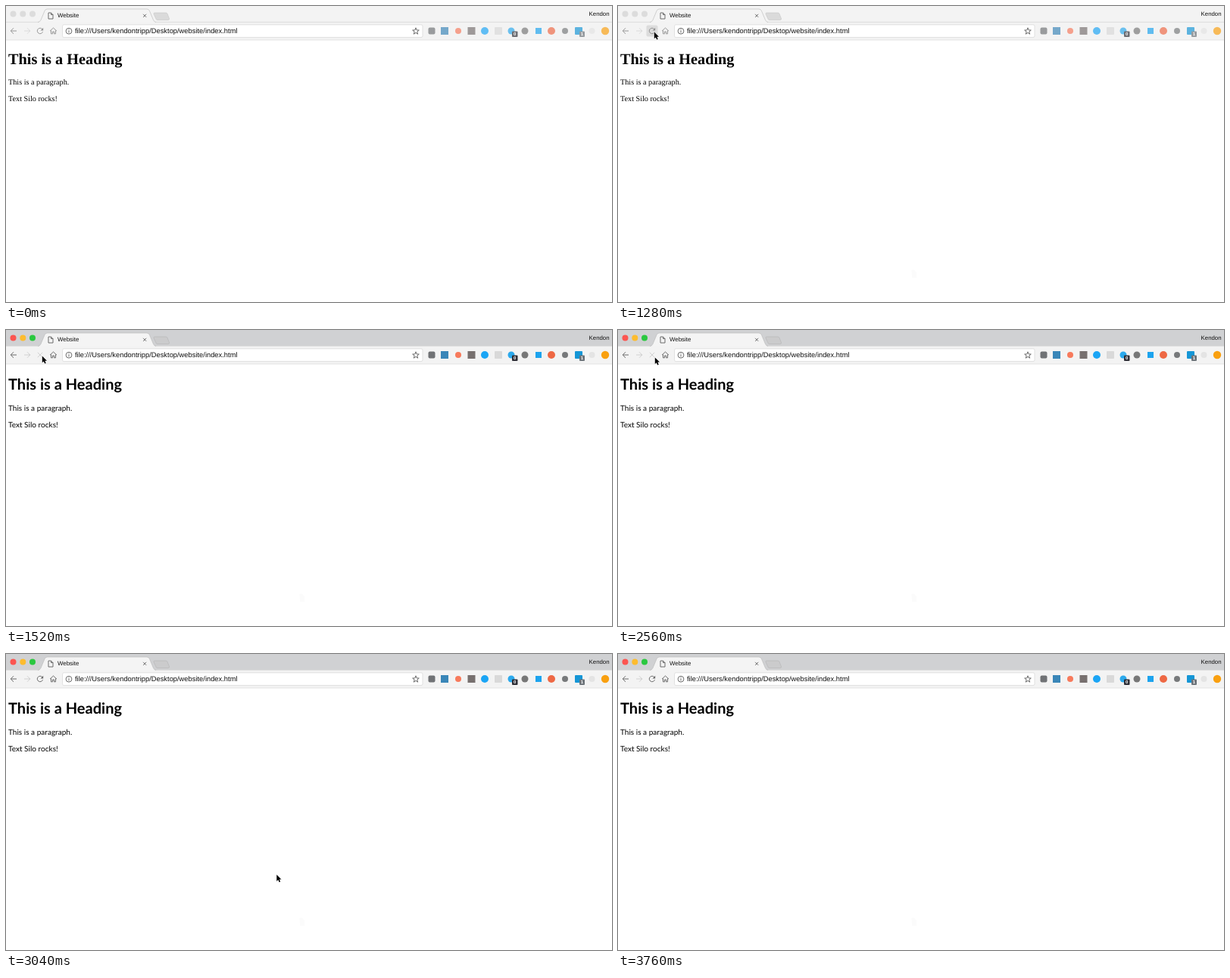
Write an HTML page that moves like this. It is 800 px wide and 392 px high and loops after 4160 ms.

```html
<!DOCTYPE html>
<html lang="en">
<head>
<meta charset="utf-8">
<title>Website</title>
<style>
  html, body { margin: 0; width: 100%; height: 100%; overflow: hidden; background: #fff; }
  svg { display: block; width: 100vw; height: 100vh; }
  text { font-family: "Liberation Sans", Arial, sans-serif; fill: #111; text-rendering: geometricPrecision; }
  .page text { font-family: "Liberation Serif", Times, serif; font-size: 10.2px; fill: #000; }
  .page .head { font-size: 20.3px; font-weight: bold; }
  .page.lato text { font-family: Lato, sans-serif; font-size: 10.05px; }
  .page.lato .head { font-size: 20.05px; }
  .line { fill: none; stroke: #6b6b6b; stroke-width: 1; }
  .badge { font-size: 6px; font-weight: bold; fill: #fff; text-anchor: middle; }
  #strip { fill: #f3f3f3; }
  #plus { fill: #dadada; stroke: #c4c4c4; stroke-width: .6; }
  #lights { fill: #dcdcdc; }
  .faded { opacity: .68; }
  .active #strip { fill: #d0d1d3; }
  .active #plus { fill: #cbcbcc; stroke: #b4b4b4; }
  .active .faded { opacity: 1; }
  .active #lights :nth-child(1) { fill: #fc5550; }
  .active #lights :nth-child(2) { fill: #fdbc2e; }
  .active #lights :nth-child(3) { fill: #2ac83f; }
</style>
</head>
<body>
<svg id="stage" viewBox="0 0 800 392">
  <rect id="strip" width="800" height="22"/>
  <rect y="21" width="800" height="24" fill="#f3f3f3"/>
  <path d="M0 21.3H44M197 21.3H800" stroke="#c9c9c9" stroke-width=".6"/>
  <path d="M0 45H800" stroke="#dedede" stroke-width=".8"/>
  <path d="M42 21.6Q45 21 46 18.5L51 6.5Q52 4 54.5 4H186Q188.5 4 189.5 6.5L194.5 18.5Q195.5 21 198 21.6" fill="#f4f4f4" stroke="#b8b8b8" stroke-width=".6"/>
  <path id="plus" d="M196.5 9H211Q212.5 9 213 10.2L215.5 16.5Q216 18.5 214 18.5H200Q198.5 18.5 198 17L195 10.5Q194.5 9 196.5 9Z"/>
  <g id="lights"><circle cx="9.5" cy="10.6" r="4"/><circle cx="22.3" cy="10.6" r="4"/><circle cx="35" cy="10.6" r="4"/></g>

  <path class="line" d="M56 9H59.5L62 11.5V17H56ZM59.5 9V11.5H62"/>
  <text x="68" y="15.2" font-size="7.9">Website</text>
  <path class="line" d="M181.2 10.8L185.2 14.8M185.2 10.8L181.2 14.8"/>
  <text x="796.5" y="13.4" font-size="7.8" text-anchor="end">Kendon</text>

  <rect id="hover" x="37.5" y="25.5" width="15" height="15" rx="2" fill="#dcdcdc"/>
  <g class="faded">
    <path class="line" d="M14 33H6.3M10 29.2L6.2 33L10 36.8"/>
    <path class="line" d="M24 33H31.7M28 29.2L31.8 33L28 36.8" opacity=".25"/>
    <g id="reload">
      <path class="line" d="M48 30.8A3.7 3.7 0 1 0 48.5 34.2"/>
      <path d="M49.2 28.8V32.4H45.6Z" fill="#6b6b6b"/>
    </g>
    <path id="stop" class="line" d="M41.8 29.8L48.2 36.2M48.2 29.8L41.8 36.2" opacity=".25"/>
    <path class="line" d="M58 33.2L62.5 29L67 33.2M59.5 32.5V36.8H61.5V34H63.5V36.8H65.5V32.5"/>
  </g>

  <rect x="74.5" y="24.8" width="475.5" height="16.8" rx="2" fill="#fff" stroke="#d6d6d6" stroke-width=".7"/>
  <circle class="line" cx="83" cy="33.2" r="3.9"/>
  <path class="line" d="M83 32.5V35.4M83 30.7V31.7"/>
  <text x="91" y="36.2" font-size="9.35">file:///Users/kendontripp/Desktop/website/index.html</text>
  <path class="line" d="M541 28.8L542.1 31.9L545.3 32L542.8 34L543.7 37.2L541 35.4L538.3 37.2L539.2 34L536.7 32L539.9 31.9Z"/>

  <g class="faded">
    <g id="icons"></g>
    <rect x="668" y="33.5" width="7.5" height="7.5" rx="1" fill="#2d2d35"/>
    <text class="badge" x="671.7" y="39.4">0</text>
    <rect x="757" y="33.5" width="7" height="7.5" rx="1" fill="#6c7379"/>
    <text class="badge" x="760.5" y="39.4">1</text>
  </g>

  <g class="page" id="serif">
    <text class="head" x="3" y="76.7">This is a Heading</text>
    <text x="3" y="104.3">This is a paragraph.</text>
    <text x="3" y="126">Text Silo rocks!</text>
  </g>
  <g class="page lato" id="lato">
    <text class="head" x="3" y="78.5">This is a Heading</text>
    <text x="3" y="106.5">This is a paragraph.</text>
    <text x="3" y="128.5">Text Silo rocks!</text>
  </g>

  <path id="smear" d="M387.5 349.5H391L394 353V360H388Z" fill="#fbfbfb"/>
  <path id="cursor" d="M0 0V8.6L2 6.8L3.4 10L4.9 9.3L3.6 6.2H6.2Z" fill="#000" stroke="#fff" stroke-width=".8" paint-order="stroke"/>
</svg>
<script>
const LOOP = 4160, STEP = 80;
const $ = id => document.getElementById(id);
const show = (id, on) => $(id).style.display = on ? '' : 'none';

// Toolbar buttons: centre x, half size, colour, corner radius
const icons = [
  [562, 4.5, '#707275', 2], [579, 5, '#3a86b8', 0], [597, 4, '#f77a5c', 4],
  [614.5, 5, '#77706f', 0], [632, 5, '#1ba5f5', 5], [650, 5, '#d9d9d9', 1],
  [667, 4.5, '#2ba9ec', 4.5], [685, 4.5, '#777777', 4.5], [703, 4, '#1ca3ee', 0],
  [720, 5, '#ee6844', 5], [738, 4, '#77797b', 4], [756, 5, '#1596d6', 1],
  [773.5, 4, '#e4e4e4', 4], [791, 5.2, '#f9a010', 5.2]
];
$('icons').innerHTML = icons.map(([x, r, color, rx]) =>
  `<rect x="${x - r}" y="${33 - r}" width="${2 * r}" height="${2 * r}" rx="${rx}" fill="${color}"/>`).join('');

// Pointer stops: time, x, y
const path = [
  [240, 390, 350], [320, 200, 215], [400, 106, 163], [480, 106, 163], [560, 104.6, 155.4],
  [1040, 47.8, 34.6], [2480, 47.8, 34.6], [2560, 48.8, 36.4], [3040, 357.3, 292.3],
  [3280, 357.3, 292.3], [3680, 373, 386]
];

function pointer(t) {
  const i = path.findIndex(p => p[0] >= t);
  const b = path[i], a = path[Math.max(0, i - 1)];
  const k = b === a ? 1 : (t - a[0]) / (b[0] - a[0]);
  const e = k * k * (3 - 2 * k);
  return [a[1] + (b[1] - a[1]) * e, a[2] + (b[2] - a[2]) * e];
}

function draw(now) {
  const t = Math.floor(now % LOOP / STEP) * STEP;
  const loaded = t >= 1440, stopping = loaded && t < 2640;
  $('stage').classList.toggle('active', t >= 1360);
  show('serif', !loaded);
  show('lato', loaded);
  show('hover', t >= 1120 && !loaded);
  show('stop', stopping);
  show('reload', !stopping);
  show('smear', t >= 320);
  const visible = t >= 240 && t <= 3680;
  show('cursor', visible);
  if (visible) $('cursor').setAttribute('transform', `translate(${pointer(t)})`);
}

function tick() {
  draw(performance.now());
  requestAnimationFrame(tick);
}
tick();
</script>
</body>
</html>
```
